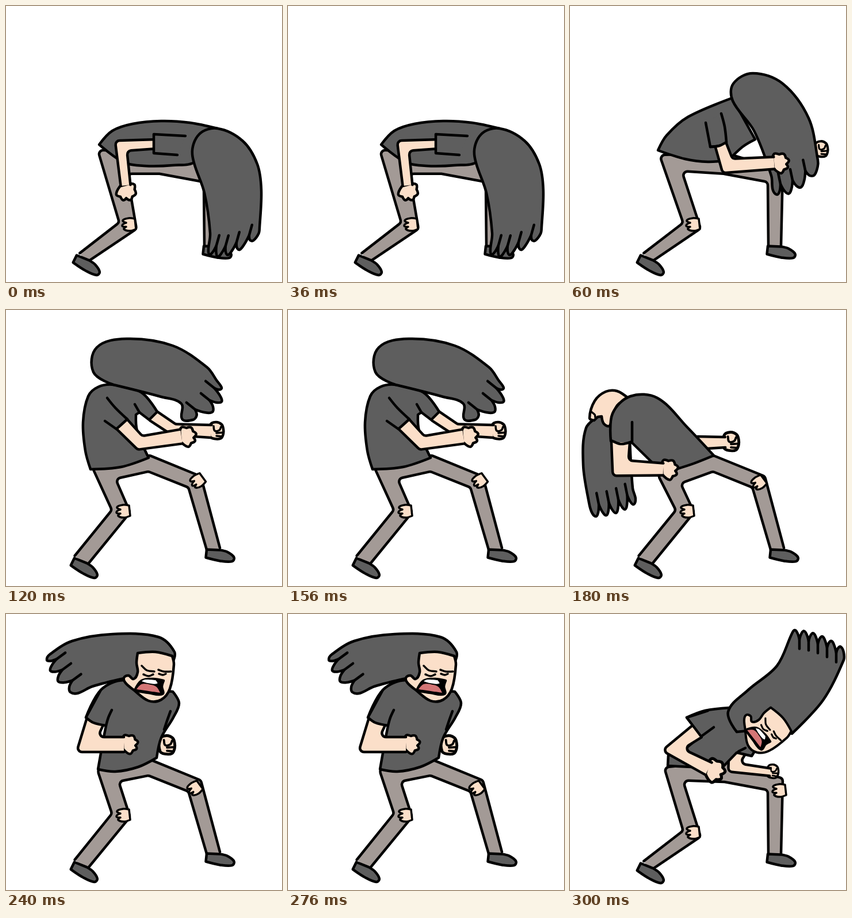
An HTML page with a canvas for the animation above (0.36 s loop, 480 px wide and 480 px high).

```html
<!DOCTYPE html>
<html>
<head>
<meta charset="utf-8">
<style>
html, body { margin: 0; width: 100%; height: 100%; overflow: hidden; background: #fff; }
canvas { display: block; width: 480px; height: 480px; }
</style>
</head>
<body>
<canvas id="stage" width="480" height="480"></canvas>
<script>
const ctx = document.getElementById("stage").getContext("2d");
const STEP = 60, GREY = "#5e5e5e", CLOTH = "#a39a96", SKIN = "#fbdfc9";

// Points are written "x,y"; "!" marks a sharp corner.
const parse = text => text.split(" ").map(t => {
  const [x, y] = t.split(",").map(parseFloat);
  return { x, y, sharp: t.endsWith("!") };
});

function trace(pts, closed) {
  const n = pts.length;
  const at = i => closed ? pts[(i + n) % n] : pts[Math.max(0, Math.min(n - 1, i))];
  const handle = (i, len) => {
    const p = at(i), a = at(i - 1), b = at(i + 1);
    const k = p.sharp ? 0 : len / 3 / (Math.hypot(b.x - a.x, b.y - a.y) || 1);
    return [p.x + (b.x - a.x) * k, p.y + (b.y - a.y) * k];
  };
  ctx.beginPath();
  ctx.moveTo(pts[0].x, pts[0].y);
  for (let i = 0; i < (closed ? n : n - 1); i++) {
    const p = at(i), q = at(i + 1), len = Math.hypot(q.x - p.x, q.y - p.y);
    ctx.bezierCurveTo(...handle(i, len), ...handle(i + 1, -len), q.x, q.y);
  }
  if (closed) ctx.closePath();
}

function stroke(width) {
  ctx.lineWidth = width;
  ctx.stroke();
}

function blob(color, pts, width = 4.5) {
  trace(typeof pts === "string" ? parse(pts) : pts, true);
  ctx.fillStyle = color;
  ctx.fill();
  if (width) stroke(width);
}

function line(text, width = 3.5) {
  trace(parse(text), false);
  stroke(width);
}

function place(x, y, deg, scale, paint) {
  ctx.save();
  ctx.translate(x, y);
  ctx.rotate(deg * Math.PI / 180);
  ctx.scale(scale, scale);
  paint();
  ctx.restore();
}

// Tapered tube through joints [x, y, width], outlined along its sides only.
function limb(color, joints) {
  const side = sign => joints.map(([x, y, w], i) => {
    const dir = (a, b) => {
      if (!a || !b) return [0, 0];
      const d = Math.hypot(b[0] - a[0], b[1] - a[1]);
      return [(b[0] - a[0]) / d, (b[1] - a[1]) / d];
    };
    const u = dir(joints[i - 1], joints[i]), v = dir(joints[i], joints[i + 1]);
    const tx = u[0] + v[0], ty = u[1] + v[1], k = sign * w / 2 / Math.hypot(tx, ty);
    return [x - ty * k, y + tx * k];
  });
  const run = (pts, begin) => {
    begin(...pts[0]);
    for (let i = 1; i < pts.length - 1; i++) ctx.arcTo(...pts[i], ...pts[i + 1], 7);
    ctx.lineTo(...pts.at(-1));
  };
  const move = (x, y) => ctx.moveTo(x, y), join = (x, y) => ctx.lineTo(x, y);
  const left = side(-1), right = side(1);
  ctx.beginPath();
  run(left, move);
  run([...right].reverse(), join);
  ctx.fillStyle = color;
  ctx.fill();
  ctx.beginPath();
  run(left, move);
  run(right, move);
  stroke(4.5);
}

const shoe = (x, y, deg) => place(x, y, deg, 1, () =>
  blob(GREY, "-12,0! -13,14! 12,19 33,19 36,12 24,3 11,0!"));

const patch = (x, y, deg) => place(x, y, deg, 1, () =>
  blob(SKIN, "9,-10! -2,-11 -12,-7 -6,-3! -13,2 -6,4! -10,8 0,11 11,8!", 3.5));

const hand = (x, y, deg, scale = 1) => place(x, y, deg, scale, () =>
  blob(SKIN, "0,-9! 4,-16 12,-14! 20,-14 23,-7! 28,-2 23,4! 25,10 18,13! 12,19 0,9!"));

const fist = (x, y, deg, scale = 1) => place(x, y, deg, scale, () => {
  blob(SKIN, "0,-10 10,-15 20,-11 23,-3 23,5 19,13 8,14 0,10");
  line("6,-8 8,0 16,-1 19,-7");
  line("11,4 23,3");
  line("11,9 21,10");
});

function sleeve(text) {
  trace(parse(text), false);
  ctx.fillStyle = GREY;
  ctx.fill();
  stroke(4.5);
}

const LOW = { ankleL: [134, 438, 20], kneeL: [212, 382, 32], seat: [270, 274, 36], kneeR: [357, 296, 33], ankleR: [356, 418, 22], patchL: [215, 380] };
const HIGH = { ankleL: [130, 436, 27], kneeL: [200, 350, 32], seat: [249, 267, 28], kneeR: [328, 299, 29], ankleR: [361, 417, 23], patchL: [205, 350] };

function legs(s, ...hip) {
  limb(CLOTH, [s.ankleL, s.kneeL, hip, s.seat, s.kneeR, s.ankleR]);
  shoe(s.ankleL[0], s.ankleL[1], 22);
  shoe(s.ankleR[0], s.ankleR[1], 2);
  patch(...s.patchL, 0);
}

// Hair: n locks with tips on a curve a-m-b, split by gap, closed by the crown.
function hair(n, a, m, b, gap, crown) {
  const on = (u, back) => {
    const v = 1 - u;
    const mix = k => a[k] * v * v + (4 * m[k] - a[k] - b[k]) * u * v + b[k] * u * u + gap[k] * back;
    return { x: mix(0), y: mix(1) };
  };
  const step = 1 / (n - 1), pts = [], notches = [];
  for (let i = 0; i < n; i++) {
    const u = i * step;
    pts.push(on(u - step * .3, .35), on(u, 0), on(u + step * .3, .35));
    if (i < n - 1) {
      pts.push({ ...on(u + step / 2, 1), sharp: true });
      notches.push([on(u + step / 2, 1), on(u + step / 2, 2)]);
    }
  }
  blob(GREY, [...pts, ...parse(crown)]);
  for (const pair of notches) {
    trace(pair, false);
    stroke(4.5);
  }
}

const face = (x, y, deg, scale) => place(x, y, deg, scale, () => {
  blob(SKIN, "21,-44! 52,-46 81,-39! 84,-24 77,18 62,37 40,39 14,20 0,8 -3,-1 5,-5 14,1 21,-11 19,-27");
  line("28,-22 37,-14 50,-12");
  line("31,-7 40,-4 48,-7");
  line("57,-15 66,-12 79,-12");
  line("58,-8 65,-6 70,-8");
  blob("#000", "16,21! 28,4 48,1 66,4! 63,14 64,27 40,25");
  blob("#d47676", "19,19! 28,10 44,11 54,15 60,25! 40,22", 0);
  blob("#fff", "28,5! 34,2 52,3! 55,9 38,8", 0);
});

const poses = [
  () => {
    legs(LOW, 185, 271, 66);
    blob(GREY, "162,241! 185,217 220,205 270,200 320,203 368,213! 330,270 290,277 240,278 205,272");
    hand(207, 311, 75);
    limb(SKIN, [[262, 240, 16], [200, 243, 27], [208, 312, 17]]);
    sleeve("312,226! 257,223! 257,256! 298,259!");
    hair(5, [354, 432], [386, 433], [430, 408], [5, -18],
      "441,385 444,320 437,275 412,235 368,213 336,223 324,258 345,325 355,395");
  },
  () => {
    legs(LOW, 175, 273, 48);
    blob(GREY, "153,251! 168,225 205,193 282,160! 322,232! 300,245 276,268! 240,271 200,266");
    sleeve("236,203! 244,245! 260,243 272,237! 269,210 263,187!");
    fist(427, 249, 0, .92);
    hair(4, [360, 328], [391, 322], [425, 294], [-4, -19],
      "431,268 415,195 370,135 318,117 284,135 283,165 320,217 350,295");
    hand(353, 273, -5);
    limb(SKIN, [[262, 241, 20], [274, 278, 30], [355, 273, 21]]);
    line("244,245 260,243 272,237", 4.5);
  },
  () => {
    legs(HIGH, 170, 283, 46);
    patch(334, 297, -30);
    fist(355, 210, 0);
    limb(SKIN, [[256, 184, 20], [292, 208, 20], [357, 211, 22]]);
    blob(GREY, "187,130 160,134 143,150 134,195 138,245 147,277! 200,273 248,257! 228,210 226,182! 232,178! 249,191! 263,177! 235,143");
    line("224,164 232,178", 4.5);
    hand(303, 220, -5);
    limb(SKIN, [[201, 198, 25], [233, 231, 25], [305, 220, 25]]);
    sleeve("176,153! 190,170 211,190! 192,207! 172,193!");
    hair(4, [375, 135], [369, 169], [325, 191], [-15, -12],
      "305,163 270,151 187,130! 152,108 158,65 210,50 290,62 350,100");
  },
  () => {
    fist(268, 229, 0, 1.1);
    limb(SKIN, [[222, 231, 22], [270, 230, 18]]);
    legs(HIGH, 172, 293, 44);
    patch(329, 300, -30);
    hair(5, [45, 359], [80, 353], [111, 338], [-4, -20],
      "109,310 104,225! 70,195! 53,183! 28,205 23,270 33,335");
    blob(SKIN, "42,192! 34,188 43,158 62,142 82,141 102,154! 82,166 69,201 59,198 55,185! 48,186!");
    line("37,177 43,182 44,187");
    blob(GREY, "71,228! 74,180 105,150 152,153 205,205 250,253! 215,267 184,277! 160,282! 107,230! 88,234");
    hand(160, 277, -3);
    limb(SKIN, [[88, 230, 32], [88, 275, 38], [162, 277, 21]]);
    line("72,227 88,233 108,229! 108,195", 4.5);
  },
  () => {
    legs(HIGH, 177, 280, 44);
    patch(329, 303, -30);
    fist(268, 228, 0, 1.1);
    blob(GREY, "205,115 165,132 139,180! 174,194! 168,225 160,270! 190,274 230,266 262,250! 270,215 291,180 301,155 290,135! 240,130!");
    line("286,169 281,183 275,201", 4.5);
    hand(203, 226, -3, .95);
    limb(SKIN, [[155, 187, 31], [141, 227, 45], [205, 227, 26]]);
    sleeve("165,132! 139,180! 152,189 174,194! 178,180 184,167!");
    hair(4, [71, 80], [83, 108], [112, 136], [15, -11],
      "150,126 205,112! 235,115! 290,84! 293,66 265,40 185,35 115,47");
    face(208, 112, 0, 1);
  },
  () => {
    legs(LOW, 180, 278, 40);
    patch(365, 307, 0);
    fist(344, 273, 5, .8);
    limb(SKIN, [[290, 243, 28], [285, 267, 24], [348, 275, 13]]);
    blob(GREY, "203,180! 235,168 278,163! 324,234! 316,247! 290,241! 264,268! 210,266 170,264! 171,245! 196,238! 228,212!");
    line("293,239 305,233", 4.5);
    hand(238, 268, 15, 1.15);
    limb(SKIN, [[221, 204, 26], [178, 236, 36], [241, 269, 24]]);
    sleeve("240,168! 203,180! 228,213! 250,197!");
    hair(6, [391, 28], [431, 36], [471, 57], [0, 16],
      "476,80 440,150 386,208! 340,200! 290,205! 275,170 310,132 360,90");
    face(308, 178, 44, .9);
  }
];

ctx.strokeStyle = "#000";
ctx.lineCap = ctx.lineJoin = "round";
const start = performance.now();
function tick() {
  ctx.clearRect(0, 0, 480, 480);
  poses[Math.floor((performance.now() - start) / STEP) % poses.length]();
  requestAnimationFrame(tick);
}
tick();
</script>
</body>
</html>
```
